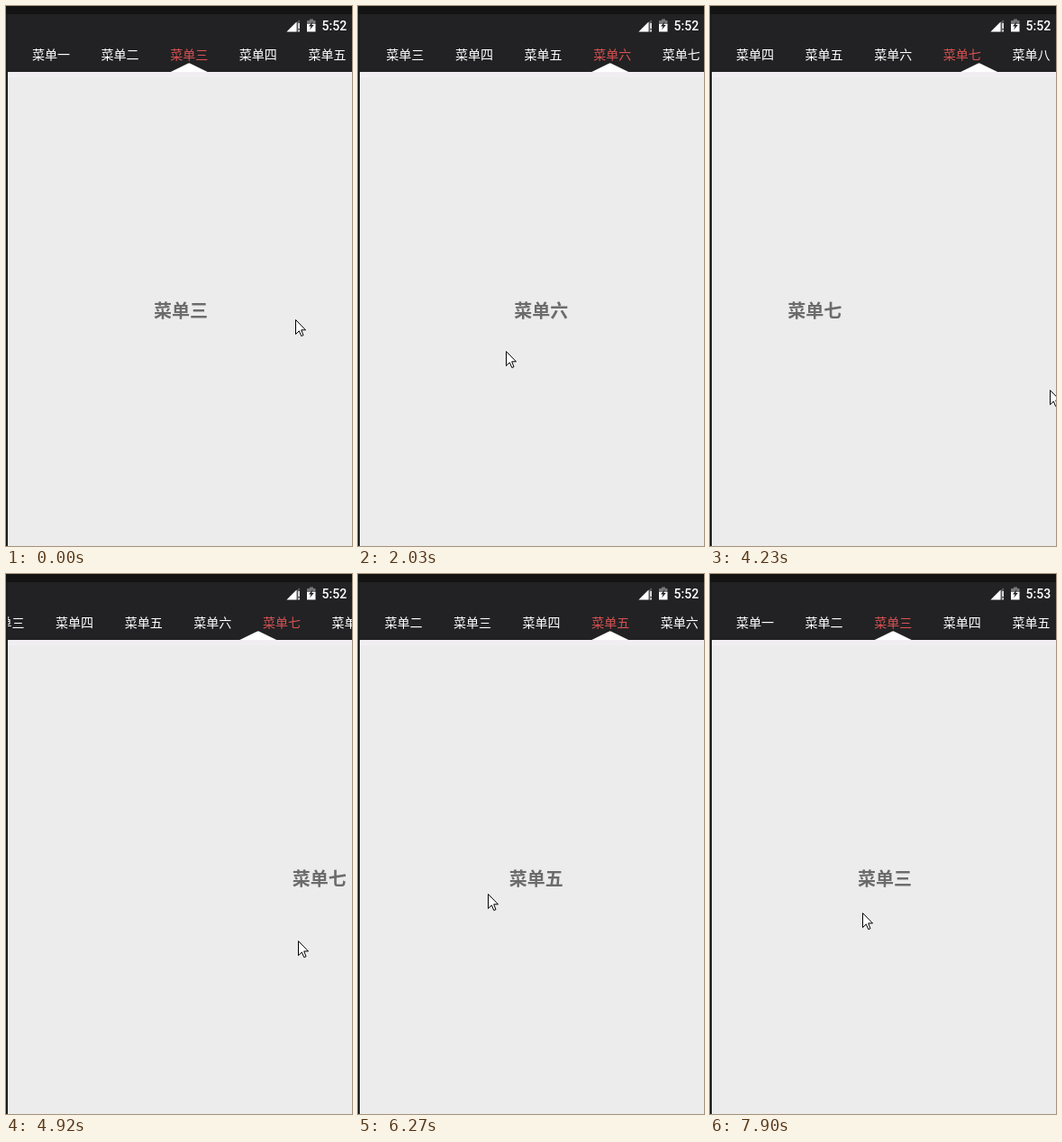
Animation of 384 by 598 pixels, one loop 8 s. Source, as an HTML page:

```html
<!DOCTYPE html>
<html lang="zh-CN">
<head>
<meta charset="utf-8">
<title>菜单</title>
<style>
html, body { margin: 0; width: 100%; height: 100%; overflow: hidden; background: #ececec; }
svg { display: block; width: 100vw; height: 100vh; }
text { font-family: "Noto Sans CJK SC", "Noto Sans CJK", sans-serif; text-anchor: middle; }
.tab { font-size: 14px; fill: #fff; }
.tab.on { fill: #d85252; }
.page { font-size: 20px; font-weight: 700; fill: #6b6b6b; }
#clock { font: 500 14px Roboto, sans-serif; fill: #fff; text-anchor: start; }
</style>
</head>
<body>
<svg viewBox="0 0 384 598">
  <defs><clipPath id="screen"><rect x="2" y="9" width="382" height="589"/></clipPath></defs>
  <rect width="384" height="598" fill="#1c1c1e"/>
  <rect width="384" height="9" fill="#131313"/>
  <g clip-path="url(#screen)">
    <rect x="2" y="9" width="382" height="64" fill="#222224"/>
    <rect x="2" y="73" width="382" height="525" fill="#ececec"/>
    <rect x="2" y="73" width="382" height="6" fill="#f1eef2"/>
    <g id="tabs"></g>
    <path id="mark" d="M-20.5 73L-1.5 63.700Q0 63 1.5 63.700L20.5 73Z" fill="#fff"/>
    <g id="pages"></g>
  </g>
  <path d="M311.5 28.5L326 15V28.5Z" fill="#57575a"/>
  <path d="M311.5 28.5L322.5 17.5V28.5Z" fill="#fff"/>
  <path d="M324.300 19h1.500v6h-1.500zM324.300 26.5h1.500v2h-1.500z" fill="#fff"/>
  <path d="M337 14.5h4v1.5h2.5v5h-9.500v-5h3z" fill="#77777a"/>
  <path d="M334 20h9.500v8.500h-9.500z" fill="#fff"/>
  <path d="M340.500 17L336 22.500H338.500L337 26.500L341.800 21H339.300Z" fill="#222224"/>
  <text id="clock" x="350.500" y="27"></text>
  <path id="cursor" d="M.5 .5V16.500L4.300 12.800L6.800 18.500L9 17.600L6.700 11.800H11.500Z" fill="#fff" stroke="#000"/>
</svg>
<script>
const LOOP = 8000, TAB = 76.6, PAGE = 384, TICK = 136.25;
const names = [..."一二三四五六七八"].map(n => "菜单" + n);
const $ = id => document.getElementById(id);

// Five swipes forward, then five back; mid is the moment halfway through
const swipes = Array.from({ length: 10 }, (_, n) => {
  const i = n % 5;
  return n < 5
    ? { dir: 1, mid: 320 + 750 * i, grab: [321 + 2 * i, 347 - 4.5 * i], drop: [164, 366 + 4 * i * i] }
    : { dir: -1, mid: 4130 + 780 * i, grab: [168 - 10.5 * i, 325 + 9 * i], drop: [377 - 10 * i, 425] };
});

// The pointer waits at the grab point, drags, then rests where it let go
const stops = [
  ...swipes.flatMap(({ mid, grab, drop }) =>
    [[mid - 345, grab], [mid - 255, grab], [mid + 75, drop], [mid + 210, drop]]),
  [7880, [169, 375]]
];

const clamp = (v, lo, hi) => Math.min(Math.max(v, lo), hi);
const ease = u => u * u * (3 - 2 * u);

function pointer(t) {
  const next = stops.findIndex(([time]) => time > t);
  if (next < 0) return stops[stops.length - 1][1];
  const [t0, from] = stops[next - 1], [t1, to] = stops[next];
  const u = ease((t - t0) / (t1 - t0));
  return from.map((v, k) => Math.round(v + (to[k] - v) * u));
}

// An S-curve whose first hundredth is lost to touch slop
const swipe = t => Math.max(0, (1 / (1 + Math.exp(-t / 56)) - .01) / .99);
const pagePos = t => swipes.reduce((pos, { dir, mid }) => pos + dir * swipe(t - mid), 2);

function addTexts(id, cls, y) {
  return names.map(name => {
    const el = document.createElementNS("http://www.w3.org/2000/svg", "text");
    el.textContent = name;
    el.setAttribute("class", cls);
    el.setAttribute("y", y);
    return $(id).appendChild(el);
  });
}
const tabs = addTexts("tabs", "tab", 59);
const pages = addTexts("pages", "page", 345);

function draw(time) {
  const t = Math.max(0, 120 + TICK * Math.floor((time - 120) / TICK));
  const pos = pagePos(t);
  const tabPos = pagePos(t - 14); // the tab strip trails the pages slightly
  const scroll = clamp(tabPos - 3, 0, 3);
  const active = Math.round(pos);
  tabs.forEach((el, i) => {
    el.setAttribute("x", 50 + (i - scroll) * TAB);
    el.classList.toggle("on", i === active);
  });
  pages.forEach((el, i) => el.setAttribute("x", 194 + (i - pos) * PAGE));
  $("mark").setAttribute("transform", `translate(${50 + (tabPos - scroll) * TAB})`);
  $("cursor").setAttribute("transform", `translate(${pointer(t)})`);
  $("clock").textContent = t < 7750 ? "5:52" : "5:53";
}

const begin = performance.now();
function frame() {
  draw((performance.now() - begin) % LOOP);
  requestAnimationFrame(frame);
}
frame();
</script>
</body>
</html>
```
